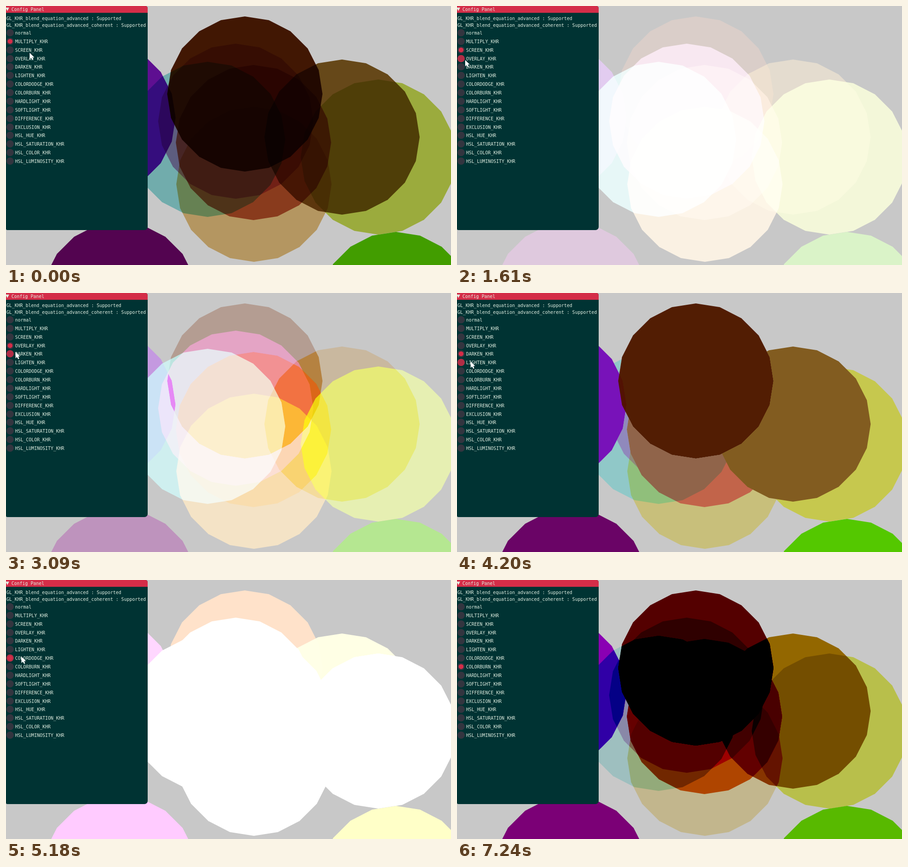
Animation of 980 by 571 pixels, one loop 7.99 s. Source, as an HTML page with a canvas:

```html
<!DOCTYPE html>
<html lang="en">
<head>
<meta charset="utf-8">
<title>Blend modes</title>
<style>
html, body { margin: 0; height: 100%; overflow: hidden; background: #c8c8c8; }
canvas { display: block; }
</style>
</head>
<body>
<canvas id="stage" width="980" height="571"></canvas>
<script>
const ctx = document.getElementById('stage').getContext('2d');
const LOOP = 7990, TICK = 120;
const RED = '#d42d48', HOT = '#b02d45', IDLE = '#33353f', PANEL = '#003333', TEXT = '#e2efe2';

const modes = ('normal MULTIPLY SCREEN OVERLAY DARKEN LIGHTEN COLORDODGE COLORBURN HARDLIGHT SOFTLIGHT ' +
  'DIFFERENCE EXCLUSION HSL_HUE HSL_SATURATION HSL_COLOR HSL_LUMINOSITY').split(' ');

// Disc centres in drawing order; the order matters for overlay.
const discs = [
  { x: 202.5, y: 246, color: '#7812b9' },
  { x: 250.5, y: 647, color: '#6a0466' },
  { x: 859, y: 669, color: '#54c800' },
  { x: 526, y: 194, color: '#521d03' },
  { x: 546, y: 393, color: '#e6bf7b' },
  { x: 545, y: 301, color: '#c2644a' },
  { x: 444, y: 294, color: '#90dcdb' },
  { x: 506, y: 254, color: '#d289bc' },
  { x: 820, y: 333, color: '#c6da4e' },
  { x: 740, y: 289, color: '#825c20' }
];

// The pointer glides to each stop and then picks the next mode; the last stop is off stage.
const stops = [
  { leave: -TICK, arrive: 0, pick: 370, x: 52, y: 103 },
  { leave: 620, arrive: 740, pick: 1730, x: 18, y: 119 },
  { leave: 2100, arrive: 2220, pick: 3210, x: 21, y: 130 },
  { leave: 3460, arrive: 3700, pick: 4320, x: 30, y: 151 },
  { leave: 4440, arrive: 4560, pick: 5180, x: 34, y: 169 },
  { leave: 5800, arrive: 5920, pick: 6280, x: 36, y: 187 },
  { leave: 6640, arrive: 7240, pick: Infinity, x: 910, y: 579 }
];
const arrow = new Path2D('M0 0v14l3-3 3 5 2-1-2-5h4z');

function disc(x, y, r, color, sides) {
  ctx.beginPath();
  for (let i = 0; i < sides; i++) {
    const a = i * 2 * Math.PI / sides;
    ctx.lineTo(x + r * Math.sin(a), y - r * Math.cos(a));
  }
  ctx.fillStyle = color;
  ctx.fill();
}

function box(h, color, corners) {
  ctx.fillStyle = color;
  ctx.beginPath();
  ctx.roundRect(0, 0, 312, h, corners);
  ctx.fill();
}

function write(text, x, y) {
  ctx.fillStyle = TEXT;
  ctx.fillText(text, x, y);
}

function drawScene(mode) {
  ctx.fillStyle = '#c8c8c8';
  ctx.fillRect(0, 0, 980, 571);
  ctx.globalCompositeOperation = modes[mode].toLowerCase().replace(/^color/, 'color-');
  discs.forEach(({ x, y, color }) => disc(x, y, 171, color, 20));
  ctx.globalCompositeOperation = 'source-over';
}

function drawPanel(selected, hot) {
  box(494, PANEL, [0, 5, 7, 3]);
  box(15, RED, [0, 5, 0, 0]);
  ctx.fillStyle = TEXT;
  ctx.fill(new Path2D('M-1 3.5h8l-4 7.5z'));

  ctx.font = '10px "DejaVu Sans Mono", monospace';
  write('Config Panel', 12, 10.5);
  write('GL_KHR_blend_equation_advanced : Supported', 1, 31);
  write('GL_KHR_blend_equation_advanced_coherent : Supported', 1, 46);
  modes.forEach((name, i) => {
    const y = Math.round(59 + i * 18.87);
    disc(9, y, 8, i === hot ? HOT : IDLE, 24);
    if (i === selected) disc(9, y, 5.3, RED, 24);
    write(i ? name + '_KHR' : name, 20, y + 4);
  });
}

function drawPointer(t) {
  const i = stops.findLastIndex(stop => stop.leave <= t);
  const to = stops[i], from = stops[i - 1] || to;
  const steps = (to.arrive - to.leave) / TICK + 1;
  const p = Math.min(1, (Math.floor((t - to.leave) / TICK) + 1) / steps);
  ctx.save();
  ctx.translate(Math.round(from.x + (to.x - from.x) * p), Math.round(from.y + (to.y - from.y) * p));
  ctx.fillStyle = '#fff';
  ctx.fill(arrow);
  ctx.restore();
}

function frame(now) {
  const t = now % LOOP;
  const mode = 1 + stops.filter(stop => stop.pick <= t).length;
  // A radio lights up shortly before its pick and fades back shortly after.
  const hot = 2 + stops.findIndex(({ pick }) => t >= pick - 2 * TICK && t < pick + 250);
  drawScene(mode);
  drawPanel(mode, hot > 1 ? hot : -1);
  drawPointer(t);
  requestAnimationFrame(frame);
}
requestAnimationFrame(frame);
</script>
</body>
</html>
```
